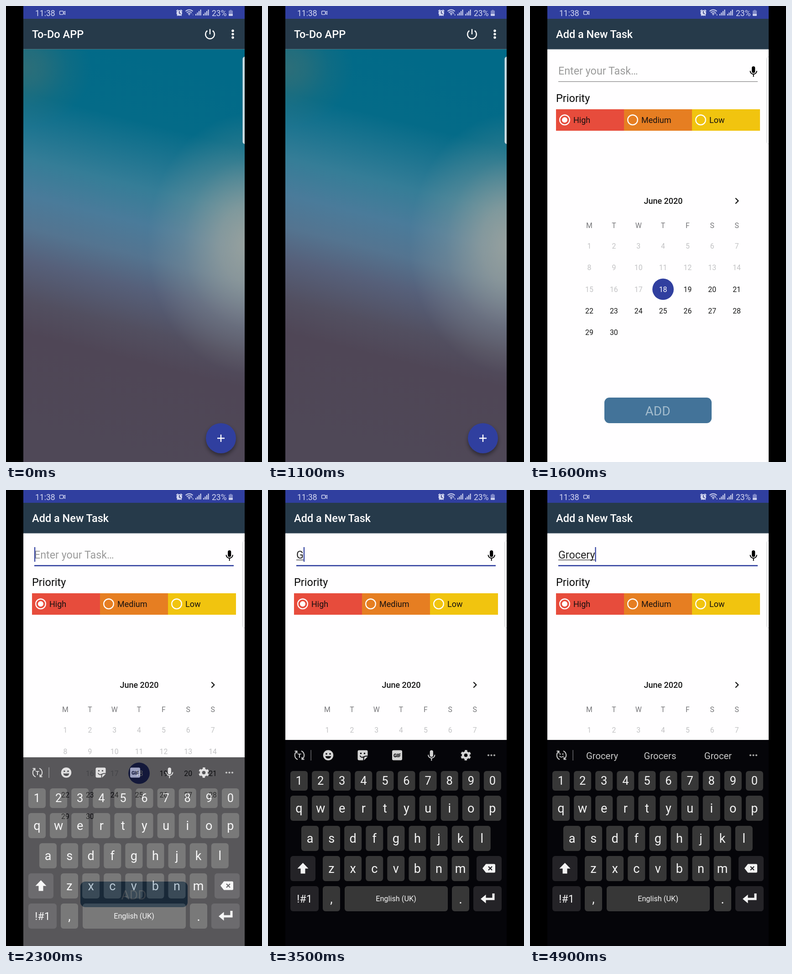
Animation of 561x998 px, one loop 5.1 s. Source, as an HTML page:

```html
<!DOCTYPE html>
<html lang="en">
<head>
<meta charset="utf-8">
<title>To-Do app</title>
<style>
  html, body { margin: 0; width: 100%; height: 100%; overflow: hidden; background: #000; }
  svg { display: block; width: 100vw; height: 100vh; }
  text { font-family: Roboto, sans-serif; white-space: pre; }
</style>
</head>
<body>
<svg id="stage" viewBox="0 0 561 998"></svg>
<script>
const BLUE = '#303f9f', BAR = '#263a4a', KEYBOARD = '#050509', KEY = '#373737', KEY_DARK = '#242327', PRESSED = '#5e5c65';
const LOOP = 5100, STEP = 100, PITCH = 47.1;

// Markup helpers
const rect = (x, y, w, h, fill, r = 0, more = '') =>
  `<rect x="${x}" y="${y}" width="${w}" height="${h}" rx="${r}" fill="${fill}" ${more}/>`;
const dot = (x, y, r, fill, more = '') => `<circle cx="${x}" cy="${y}" r="${r}" fill="${fill}" ${more}/>`;
const ring = (x, y, r, color, w, more = '') => dot(x, y, r, 'none', `stroke="${color}" stroke-width="${w}" ${more}`);
const line = (d, color, w, more = '') => `<path d="${d}" fill="none" stroke="${color}" stroke-width="${w}" ${more}/>`;
const shape = (d, fill) => `<path d="${d}" fill="${fill}"/>`;
const label = (x, y, size, str, fill, anchor = 'start', more = '') =>
  `<text x="${x}" y="${y}" font-size="${size}" fill="${fill}" text-anchor="${anchor}" ${more}>${str}</text>`;
const group = (id, body, more = '') => `<g id="${id}" ${more}>${body}</g>`;
const at = (x, y, body) => `<g transform="translate(${x} ${y})">${body}</g>`;
const times = (n, fn) => Array.from({ length: n }, (_, i) => fn(i)).join('');
const bold = 'font-weight="500"';

const mic = (x, y, color) => at(x, y,
  rect(-3.6, -11.5, 7.2, 14.5, color, 3.6) +
  line('M-7.2 -1.5a7.2 7.2 0 0 0 14.4 0M0 6v5.5', color, 2));

const appBar = title =>
  rect(38, 0, 485, 28.5, BLUE) + rect(38, 28, 485, 67, BAR) + label(57, 70, 23.5, title, '#fff', 'start', bold);

function gradients() {
  const stops = [[0, '#016a88'], [.17, '#046b88'], [.33, '#357d97'], [.42, '#4a7b9a'], [.5, '#547490'],
    [.58, '#56607a'], [.68, '#524f60'], [.76, '#4f4656'], [1, '#4f4857']];
  const glow = (id, color, alpha) => `<radialGradient id="${id}">` +
    [[0, 1], [.3, .75], [.65, .28], [1, 0]].map(([o, a]) =>
      `<stop offset="${o}" stop-color="${color}" stop-opacity="${a * alpha}"/>`).join('') + '</radialGradient>';
  return `<defs><linearGradient id="sky" gradientUnits="userSpaceOnUse" x1="330" y1="110" x2="120" y2="950">` +
    stops.map(([o, c]) => `<stop offset="${o}" stop-color="${c}"/>`).join('') + '</linearGradient>' +
    glow('sun', '#a2a69f', .9) + glow('moss', '#447070', .65) +
    `<filter id="soft" x="-50%" y="-50%" width="200%" height="200%"><feGaussianBlur stdDeviation="4"/></filter>
     <clipPath id="screen"><rect x="38" y="0" width="485" height="998"/></clipPath></defs>`;
}

function homeScreen() {
  return rect(38, 90, 485, 940, 'url(#sky)') +
    '<ellipse cx="535" cy="520" rx="225" ry="285" fill="url(#sun)"/>' +
    '<ellipse cx="38" cy="135" rx="150" ry="130" fill="url(#moss)"/>' +
    appBar('To-Do APP') + rect(38, 94, 485, 1, '#4d7580') +
    line('M441.2 54a9.8 9.8 0 1 0 11.6 0M447 50.5v11.5', '#fff', 2.4) +
    times(3, i => dot(497, 54.2 + 7.4 * i, 2.7, '#fff')) +
    dot(471, 951, 33, '#000', 'opacity=".4" filter="url(#soft)"') + dot(471, 946, 33, BLUE) +
    line('M463 946h16M471 938v16', '#fff', 2.4);
}

function addScreen() {
  const priorities = [['High', '#e74c3c'], ['Medium', '#e67e22'], ['Low', '#f1c40f']];
  const column = i => 130 + 53.85 * i;
  const day = i => {
    const n = i + 1, y = 525 + 47.3 * Math.floor(i / 7), x = column(i % 7);
    const color = n < 18 ? '#c2c2c4' : n === 18 ? '#fff' : '#161616';
    return (n === 18 ? dot(x, y + .3, 23.4, BLUE) : '') + label(x, y + 6, 15.8, n, color, 'middle');
  };
  return rect(38, 90, 485, 1010, '#fffeff') + appBar('Add a New Task') + rect(38, 94.5, 485, 1, '#c3c9ce') +
    label(62, 150, 23.3, 'Enter your Task…', '#9b9b9b', 'start', 'id="hint"') +
    label(62, 150, 23.3, '', '#222', 'start', 'id="task"') +
    rect(62, 152.5, 0, 1.2, '#222', 0, 'id="composing"') +
    rect(62, 165, 437, 1, '#6d6d6d', 0, 'id="fieldLine"') +
    rect(62, 125, 2.2, 32, BLUE, 0, 'id="caret"') +
    mic(489.7, 143.5, '#000') +
    label(57, 209.5, 23.5, 'Priority', '#080808') +
    priorities.map(([name, color], i) => at(57 + 149 * i, 226,
      rect(0, 0, 149, 47, color) + ring(19, 23.3, 10.8, '#fff', 2.3) +
      (i ? '' : dot(19, 23.3, 6, '#fff')) + label(38, 30, 18, name, '#141010'))).join('') +
    label(292, 432.5, 18, 'June 2020', '#161616', 'middle', bold) +
    line('M450.3 420.5l6 6l-6 6', '#161616', 2.3) +
    times(7, i => label(column(i), 486, 15.8, 'MTWTFSS'[i], '#77777a', 'middle')) +
    times(30, day) +
    rect(163, 857, 235, 56, '#437399', 11) + label(280, 895.5, 28, 'ADD', '#a3bccd', 'middle');
}

// Keyboard
const keys = {};
function letterRow(letters, x0, y, h = 55) {
  return [...letters].map((c, i) => {
    const x = x0 + PITCH * i, base = y + h / 2 + (h < 50 ? 8.7 : 9.5);
    keys[c] = { x: x + 19, y };
    return rect(x, y, 38, h, KEY, 6, `id="key-${c}"`) +
      label(x + 19, base, h < 50 ? 25.5 : 27, c, '#f4f4f4', 'middle', h < 50 ? '' : 'class="letter"');
  }).join('');
}

function cycleIcon(inner) {
  return at(69, 580.5, line('M-4 9.4a10.2 10.2 0 0 1 -1.8 -17.8M4 -9.4a10.2 10.2 0 0 1 1.8 17.8', '#d0d0d0', 2) +
    line('M-10.5 -9h5v5M10.5 9h-5v-5', '#d0d0d0', 2) + inner);
}

function toolbar() {
  const c = '#d4d4d4';
  const smile = at(132, 580.5, dot(0, 0, 11.2, c) + dot(-4, -3, 1.8, KEYBOARD) + dot(4, -3, 1.8, KEYBOARD) +
    shape('M-6.3 2h12.6a6.4 6.4 0 0 1 -12.6 0z', KEYBOARD));
  const sticker = at(207.5, 580.5, shape('M-8 -11h16a3 3 0 0 1 3 3v9h-4q-6 0 -6 6v4h-9a3 3 0 0 1 -3 -3v-16a3 3 0 0 1 3 -3zM3 11v-4q0 -4 4 -4h4z', c) +
    dot(-4, -4, 1.7, KEYBOARD) + dot(4, -4, 1.7, KEYBOARD) + line('M-6 1q4 6 8 2', KEYBOARD, 1.8));
  const gear = at(433.5, 580.5, ring(0, 0, 6.3, c, 5) +
    ring(0, 0, 9.6, c, 3.6, 'stroke-dasharray="5.2 4.853" transform="rotate(15)"'));
  return cycleIcon(label(0, 5, 13.5, 'T', c, 'middle', 'font-weight="700"')) + smile + sticker +
    rect(272, 569.5, 22, 22, c, 3) + label(283, 584.5, 10.5, 'GIF', KEYBOARD, 'middle', 'font-weight="900"') +
    mic(358.3, 581, c) + gear;
}

function suggestionBar() {
  const face = dot(-3, -2.5, 1.4, '#d0d0d0') + dot(3, -2.5, 1.4, '#d0d0d0') + line('M-4.5 1.5q4.5 5.5 9 0', '#d0d0d0', 1.7);
  return cycleIcon(face) + times(3, i => label(158 + 127 * i, 589, 20.3, '', '#c9c9c9', 'middle', 'class="word"'));
}

function keyboard() {
  const white = '#f4f4f4';
  return rect(38, 547, 485, 570, KEYBOARD) +
    group('tools', toolbar()) + group('words', suggestionBar()) +
    rect(93.5, 569, 1.3, 23, '#77777a') + times(3, i => dot(483 + 6.5 * i, 580.5, 2.1, '#a6a6a6')) +
    letterRow('1234567890', 49, 615, 43) + letterRow('qwertyuiop', 49, 669) +
    letterRow('asdfghjkl', 73, 735) + letterRow('zxcvbnm', 120, 801) +
    rect(49, 801, 55, 55, KEY_DARK, 6, 'id="key-shift"') +
    shape('M76.5 816l12 12.5h-7v11h-10v-11h-7z', white) +
    rect(457, 801, 55, 55, KEY_DARK, 6) +
    shape('M470 828l7.5 -9.5h18a2.5 2.5 0 0 1 2.5 2.5v14a2.5 2.5 0 0 1 -2.5 2.5h-18z', white) +
    line('M483 824l8 8M491 824l-8 8', KEY_DARK, 2.3) +
    rect(49, 867, 62, 55, KEY_DARK, 6) + label(80, 902.5, 23.5, '!#1', white, 'middle') +
    rect(120, 867, 38, 55, KEY, 6) + label(139, 904, 27, ',', white, 'middle') +
    rect(168, 867, 226, 55, KEY, 6) + label(280.5, 900, 16.3, 'English (UK)', white, 'middle') +
    rect(403, 867, 38, 55, KEY, 6) + label(422, 905, 29, '.', white, 'middle') +
    rect(450, 867, 62, 55, KEY_DARK, 6) +
    shape('M466 895l11.5 -9.5v7h14v-9.5h5v14.5h-19v7z', white) +
    group('popup', rect(-32.5, -96, 65, 80, '#29282c', 12) + label(0, -40, 40, '', '#fff', 'middle', 'id="popupLetter"'));
}

function statusIcons() {
  const c = '#d3d7f1';
  const bars = x => times(4, i => rect(x + 3.5 * i, 17.5 - 3.2 * i, 2.1, 3.2 + 3.2 * i, c));
  return label(64, 22, 17.5, '11:38', c) + label(451, 22, 17.5, '23%', c) +
    rect(117.6, 11.2, 8, 7.4, 'none', 1, `stroke="${c}" stroke-width="1.4"`) +
    line('M126 14l3.4 -2.5v7l-3.4 -2.5z', c, 1.3) +
    dot(379.8, 15.3, 6.2, c) + line('M379.8 11v4.6l3 2', '#26317c', 1.5) +
    line('M373.3 11.2l3.6 -3M386.3 11.2l-3.6 -3M375 21.5l1.5 -2M384.6 21.5l-1.5 -2', c, 1.8) +
    line('M393.5 11.5q8 -6.5 16 0M396.2 14.5q5.3 -4.2 10.6 0M398.8 17.2q2.7 -2 5.4 0', c, 1.8) +
    dot(401.5, 19, 1.3, c) +
    group('traffic', shape('M405.3 17.3l1.7 -2.3l1.7 2.3zM408 18.7h3.4l-1.7 2.3z', c)) +
    bars(415) + bars(432) +
    rect(488, 10, 9, 11.5, '#7f88c8', 1) + rect(490.5, 8.6, 4, 2, '#7f88c8') + rect(488, 17.5, 9, 4, c, 1);
}

const $ = id => document.getElementById(id);
$('stage').innerHTML = gradients() + rect(0, 0, 561, 998, '#000') +
  group('phone',
    group('home', homeScreen()) + rect(38, 0, 485, 998, '#000', 0, 'id="shade"') +
    group('add', addScreen()) + group('board', keyboard()) +
    rect(518.7, 111, 12, 191, '#fff', 5, 'fill-opacity=".78" stroke="#a9adb5" stroke-opacity=".6"') +
    statusIcons(),
    'clip-path="url(#screen)"');

// Each list holds [start, value], the last one reached applies.
const typed = [[0, ''], [3400, 'G'], [3800, 'Gr'], [3900, 'Gro'], [4200, 'Groc'], [4400, 'Groce'], [4500, 'Grocer'], [4600, 'Grocery']];
const pressed = [[0, ''], [3100, 'shift'], [3200, ''], [3300, 'g'], [3400, ''], [3700, 'r'], [3800, 'o'], [3900, ''],
  [4100, 'c'], [4200, ''], [4300, 'e'], [4400, 'r'], [4500, 'y'], [4600, '']];
const bubbles = [...pressed.filter(([t]) => t < 4600), [4600, 'y'], [4700, '']];
const guesses = [[0, ''], [3600, 'G Good Great'], [3800, 'Gr Great Green'], [3900, 'Gro Group Growing'],
  [4400, 'Groc Grocery Grocer'], [4900, 'Grocery Grocers Grocer']];
const slideIn = [[0, 998], [1200, 100], [1300, 40], [1400, 14], [1500, 4], [1600, 0]];
const boardDrop = [[0, 460], [2200, 120], [2300, 38], [2400, 8], [2500, 0]];
const current = (list, t) => list.findLast(([start]) => t >= start)[1];
const ramp = (t, from, to) => Math.min(1, Math.max(0, (t - from) / (to - from)));
const show = (node, on) => node.setAttribute('visibility', on ? 'visible' : 'hidden');
const move = (node, x, y) => node.setAttribute('transform', `translate(${x} ${y})`);

const letters = [...document.querySelectorAll('.letter')];
const words = [...document.querySelectorAll('.word')];
let lastKey = '';

function draw(t) {
  const leaving = ramp(t, 1150, 1365);
  move($('home'), 0, -20 * leaving);
  $('shade').setAttribute('opacity', .28 * leaving);
  move($('add'), 0, current(slideIn, t));
  $('add').setAttribute('opacity', t < 1200 ? 0 : t < 1300 ? .45 : 1);
  $('traffic').setAttribute('opacity', t < 600 ? .35 : 1);

  const text = current(typed, t), focused = t >= 2000;
  show($('hint'), !text);
  $('task').textContent = text;
  const width = text ? $('task').getComputedTextLength() : 0;
  $('composing').setAttribute('width', width);
  $('caret').setAttribute('x', 62 + width);
  show($('caret'), focused && !(t >= 2600 && t < 3100));
  $('fieldLine').setAttribute('fill', focused ? BLUE : '#6d6d6d');
  $('fieldLine').setAttribute('y', focused ? 164.3 : 165);
  $('fieldLine').setAttribute('height', focused ? 2.6 : 1);

  move($('board'), 0, current(boardDrop, t));
  $('board').setAttribute('opacity', ramp(t, 2100, 2400));
  const caps = t >= 3200 && t < 3400;
  for (const node of letters)
    node.textContent = caps ? node.textContent.toUpperCase() : node.textContent.toLowerCase();

  const key = current(pressed, t);
  if (lastKey) $('key-' + lastKey).setAttribute('fill', lastKey === 'shift' ? KEY_DARK : KEY);
  if (key) $('key-' + key).setAttribute('fill', PRESSED);
  lastKey = key;

  const bubble = keys[current(bubbles, t)];
  show($('popup'), bubble);
  if (bubble) {
    move($('popup'), bubble.x, bubble.y);
    const letter = current(bubbles, t);
    $('popupLetter').textContent = caps ? letter.toUpperCase() : letter;
  }

  const guess = current(guesses, t);
  show($('tools'), !guess);
  show($('words'), guess);
  words.forEach((node, i) => node.textContent = guess.split(' ')[i] || '');
}

let shown = -1;
function tick() {
  const t = Math.floor(performance.now() % LOOP / STEP) * STEP;
  if (t !== shown) draw(shown = t);
  requestAnimationFrame(tick);
}
tick();
</script>
</body>
</html>
```
